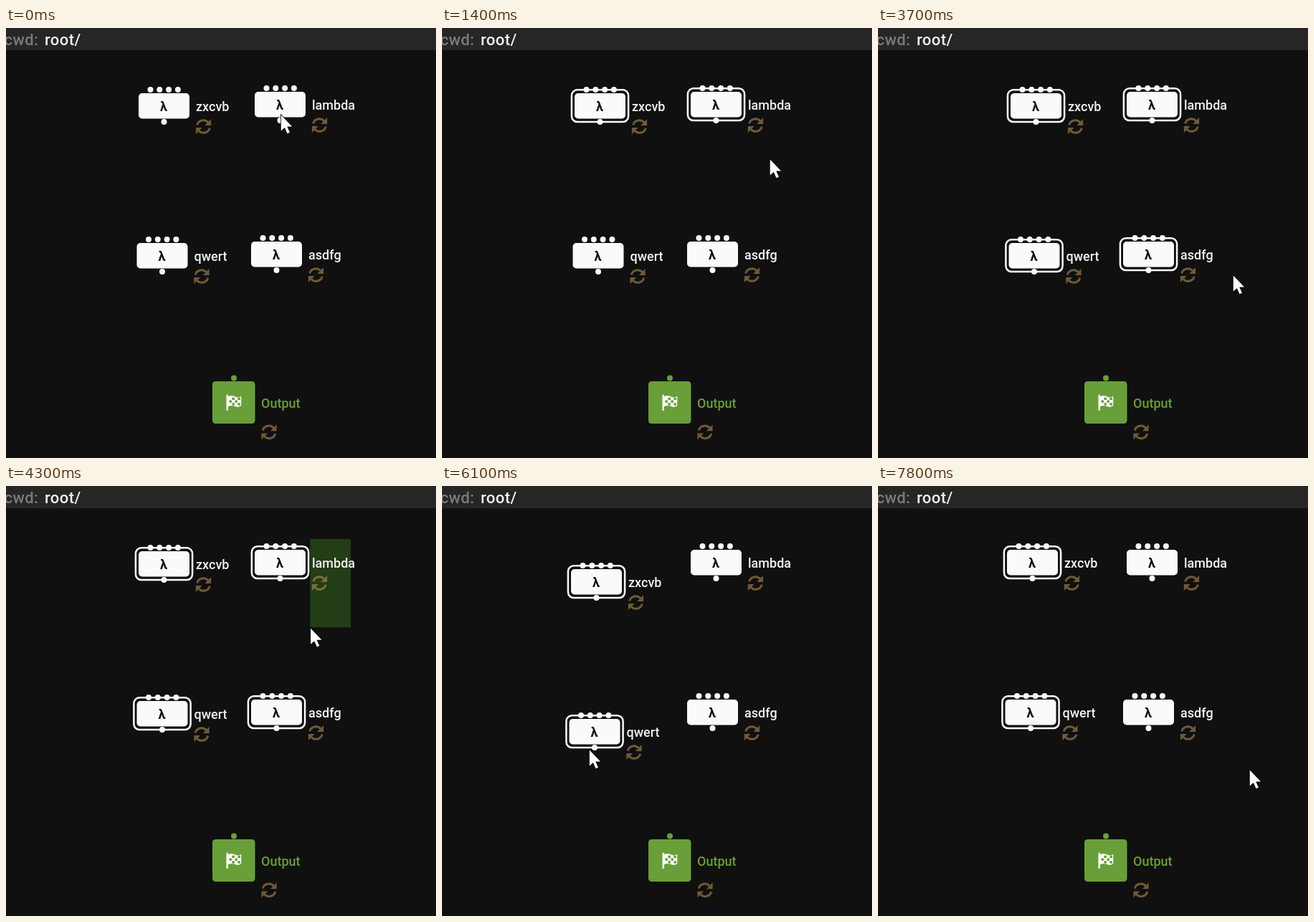
Animation, 600 px wide and 600 px high, one loop 8000 ms. Source, as an HTML page:

```html
<!DOCTYPE html>
<html lang="en">
<head>
<meta charset="utf-8">
<title>Node graph selection</title>
<style>
  html, body { margin: 0; width: 100%; height: 100%; overflow: hidden; background: #101010; }
  svg { display: block; width: 600px; height: 600px; }
  text { font: 500 18px Roboto, sans-serif; fill: #f2f2f2; }
  .cwd { font-size: 22px; letter-spacing: .45px; }
  .glyph { font-weight: 700; fill: #111; text-anchor: middle; }
</style>
</head>
<body>
<svg viewBox="0 0 600 600">
  <defs>
    <g id="half">
      <path d="M-8.8-2.2A9 9 0 0 1 6.6-5.8" fill="none" stroke="#d0a25e" stroke-width="3"/>
      <path d="M10.6-10.4V-1.6H1.8Z" fill="#d0a25e"/>
    </g>
    <g id="sync" opacity=".5">
      <use href="#half"/>
      <use href="#half" transform="rotate(180)"/>
    </g>
  </defs>
  <rect width="600" height="31" fill="#262626"/>
  <text class="cwd" x="45.4" y="23.5" text-anchor="end" style="fill:#7b7b7b">cwd:</text>
  <text class="cwd" x="54" y="23.5">root/</text>

  <path id="marquee" fill="#233d17"/>
  <g id="nodes"></g>

  <g fill="#689f38">
    <circle cx="318" cy="488.5" r="4"/>
    <rect x="288" y="493" width="59.5" height="59" rx="4.5"/>
    <text x="356" y="530" style="fill:#689f38">Output</text>
  </g>
  <use href="#sync" x="367" y="563.8"/>
  <g id="flag" fill="#689f38" transform="translate(-.3 -.7)">
    <path d="M309 513.5V533.5" stroke="#fff" stroke-width="2.4" stroke-linecap="round"/>
    <path d="M310 515Q315 512.5 319.5 515T328.5 514.5V528Q324 530.5 319.5 528.5T310 529Z" fill="#fff"/>
  </g>

  <path id="cursor" d="M.8 1.5V23.6L5.8 19L9.6 27.2L13 25.7L9.3 17.6H16.2Z"
        fill="#fff" stroke="#0a0a0a" stroke-width="1.6" paint-order="stroke"/>
</svg>
<script>
const LOOP = 8000, STEP = 100, W = 71, H = 35.5;
const GRAB = 5500, TURN = 600, DROP = GRAB + 2 * TURN;
const $ = id => document.getElementById(id);
const clamp = (v, lo, hi) => Math.max(lo, Math.min(hi, v));

// Pointer moves: begin, end, x, y; "release" marks a selection drag
const moves = [
  { begin: 0, end: 100, x: 190, y: 158 },
  { begin: 200, end: 600, x: 118, y: 45 },
  { begin: 600, end: 1100, x: 457, y: 182, release: 1400 },
  { begin: 1400, end: 1800, x: 0, y: 238 },
  { begin: 1800, end: 2200, x: 121, y: 262 },
  { begin: 2200, end: 2700, x: 478, y: 387, release: 3000 },
  { begin: 2900, end: 3200, x: 524, y: 366 },
  { begin: 3200, end: 3700, x: 495, y: 344 },
  { begin: 3700, end: 4000, x: 481, y: 74 },
  { begin: 4000, end: 4700, x: 337, y: 387, release: 5000 },
  { begin: 5100, end: GRAB, x: 210, y: 342 },
  { begin: GRAB, end: GRAB + TURN, x: 205, y: 367 },
  { begin: GRAB + TURN, end: DROP, x: 205, y: 340 },
  { begin: DROP, end: 6900, x: 221, y: 332 },
  { begin: 7100, end: 7800, x: 518, y: 395 }
];

const nodes = [
  { name: "zxcvb", x: 185, y: 91 },
  { name: "lambda", x: 347, y: 89 },
  { name: "qwert", x: 182.5, y: 300 },
  { name: "asdfg", x: 342, y: 298 }
];

const dot = (x, y) => `<circle cx="${x}" cy="${y}" r="4" fill="#fafafa"/>`;

$("nodes").innerHTML = nodes.map(n => `<g>
  <rect class="ring" x="-4.1" y="-4.8" width="${W + 8.2}" height="${H + 9.4}" rx="8"
        fill="#101010" stroke="#fafafa" stroke-width="2.5"/>
  <rect width="${W}" height="${H}" rx="5" fill="#fafafa"/>
  ${[0, 1, 2, 3].map(i => dot(16.5 + i * 12.8, -5)).join("")}${dot(W / 2, 40)}
  <text class="glyph" x="35" y="25.2">λ</text>
  <text x="80" y="24.5">${n.name}</text>
  <use href="#sync" x="90.5" y="46.5"/>
</g>`).join("");
nodes.forEach((n, i) => {
  n.el = $("nodes").children[i];
  n.ring = n.el.querySelector(".ring");
});

// Checker squares on the flag
for (let r = 0; r < 3; r++)
  for (let c = 0; c < 4; c++)
    if ((r + c) % 2)
      $("flag").innerHTML += `<rect x="${311.7 + c * 4}" y="${516.3 + r * 3.8}" width="3.5" height="3.4"/>`;

function pointer(t) {
  let x = 383, y = 120;
  for (const m of moves) {
    const k = clamp((t - m.begin) / (m.end - m.begin), 0, 1);
    const ease = k * k * (3 - 2 * k);
    x += (m.x - x) * ease;
    y += (m.y - y) * ease;
  }
  // Two swings to the left while nodes are held: first low, then high
  const p = clamp((t - GRAB) / TURN, 0, 2) * Math.PI;
  return { x: x + 31 * (Math.cos(2 * p) - 1), y: y + 30 * Math.sin(p) };
}

function box(begin, end) {
  const a = pointer(begin), b = pointer(end);
  return {
    x: Math.min(a.x, b.x), y: Math.min(a.y, b.y),
    w: Math.abs(a.x - b.x), h: Math.abs(a.y - b.y)
  };
}

const touches = (b, n) =>
  b.x < n.x + W && b.x + b.w > n.x && b.y < n.y + H && b.y + b.h > n.y;

const place = (el, p) => el.setAttribute("transform", `translate(${p.x} ${p.y})`);

function draw(t) {
  // Each drag toggles the nodes it touches
  const drags = moves.filter(m => m.release && t >= m.begin);
  const boxes = drags.map(m => box(m.begin, Math.min(t, m.end)));
  const open = drags.findIndex(m => t < m.release);
  const b = boxes[open];
  $("marquee").setAttribute("d", b ? `M${b.x} ${b.y}h${b.w}v${b.h}h${-b.w}z` : "");

  const from = pointer(GRAB), to = pointer(clamp(t, GRAB, DROP));
  for (const n of nodes) {
    const on = boxes.filter(b => touches(b, n)).length % 2;
    n.ring.style.display = on ? "" : "none";
    place(n.el, on ? { x: n.x + to.x - from.x, y: n.y + to.y - from.y } : n);
  }
  place($("cursor"), pointer(t));
}

const start = performance.now();
function tick() {
  const t = (performance.now() - start) % LOOP;
  draw(Math.floor(t / STEP) * STEP);
  requestAnimationFrame(tick);
}
tick();
</script>
</body>
</html>
```
